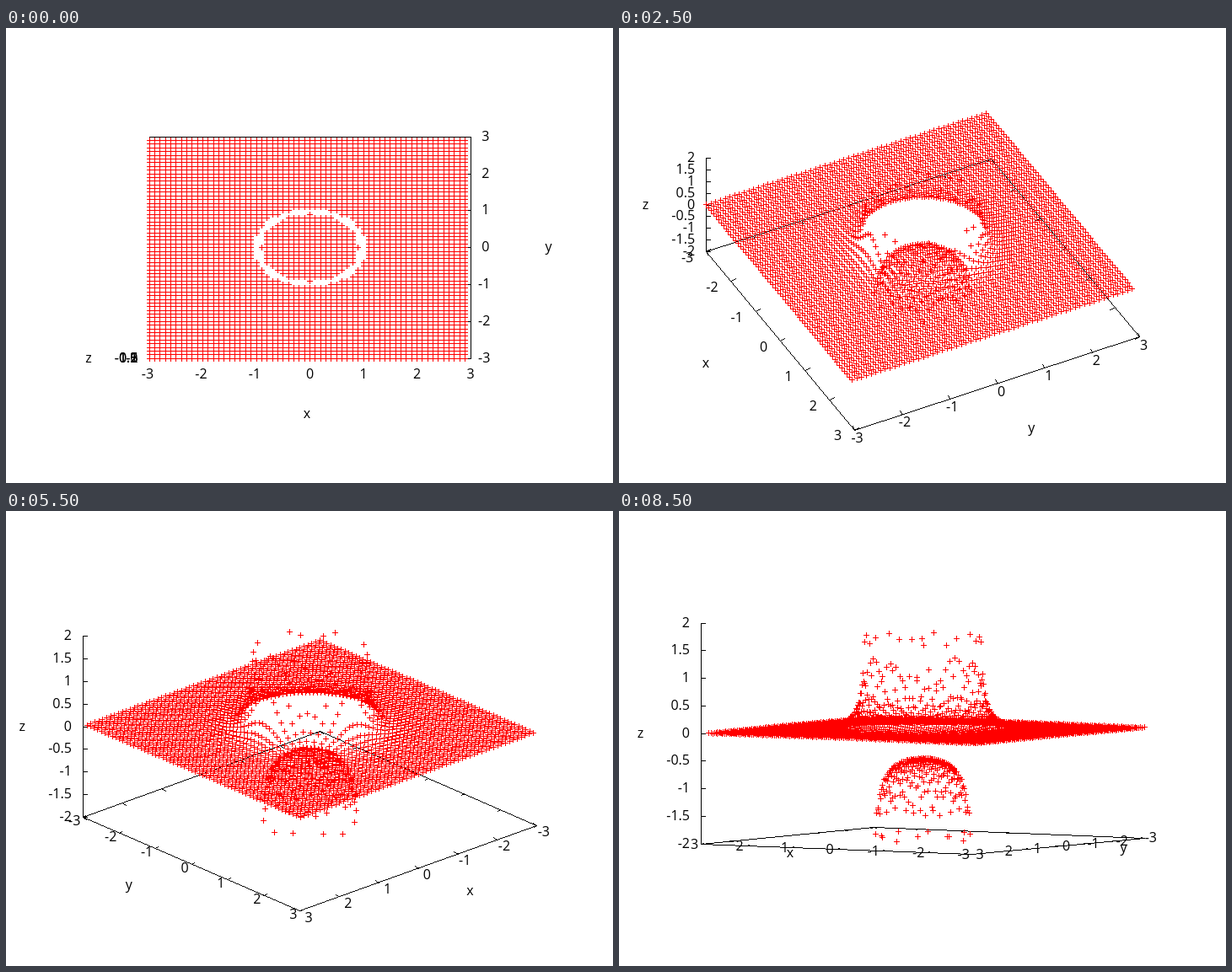
Animation, 720 px wide and 540 px high, one loop 9000 ms. Source, as an HTML page with a canvas:

```html
<!DOCTYPE html>
<html lang="en">
<head>
<meta charset="utf-8">
<title>Rotating surface plot</title>
<style>
  html, body { margin: 0; width: 100%; height: 100%; overflow: hidden; background: #fff; }
  canvas { display: block; }
</style>
</head>
<body>
<canvas id="stage" width="720" height="540"></canvas>
<script>
const ctx = document.getElementById('stage').getContext('2d');
const STEP_MS = 500, STEPS = 18;
const TILT_STEP = 5, TURN_STEP = 12.5;      // degrees per step
const CX = 360, CY = 260.2;                 // centre of the box
const W = 381, H = 263;                     // box size on screen
const RANGE = 3, Z_RANGE = 2;
const FONT = '16px "Open Sans", "Noto Sans", sans-serif';
const rad = deg => deg * Math.PI / 180;

// Complete elliptic integrals K and E by the arithmetic-geometric mean.
function elliptic(m) {
  let a = 1, b = Math.sqrt(1 - m), sum = m / 2, weight = 0.5;
  for (let i = 0; i < 12; i++) {
    const c = (a - b) / 2;
    [a, b] = [(a + b) / 2, Math.sqrt(a * b)];
    weight *= 2;
    sum += weight * c * c;
  }
  const K = Math.PI / 2 / a;
  return [K, K * (1 - sum)];
}

// Axial field of a unit current loop, in the plane of the loop.
function field(r) {
  const [K, E] = elliptic(4 * r / (1 + r) ** 2);
  return -(K / (1 + r) + E / (1 - r)) / (2 * Math.PI);
}

const points = [];
for (let i = -30; i < 30; i++) {
  for (let j = -30; j < 30; j++) {
    const n = i * i + j * j;
    if (n === 100) continue;
    const z = field(Math.sqrt(n) / 10);
    if (Math.abs(z) <= Z_RANGE) points.push([i / 10, j / 10, z]);
  }
}

function line(...ends) {
  const [x1, y1, x2, y2] = ends.map(Math.round);
  const n = Math.max(1, Math.abs(x2 - x1), Math.abs(y2 - y1));
  for (let i = 0; i <= n; i++) {
    ctx.fillRect(Math.round(x1 + (x2 - x1) * i / n), Math.round(y1 + (y2 - y1) * i / n), 1, 1);
  }
}

function text(str, x, y, align = 'center') {
  ctx.textAlign = align;
  ctx.fillText(str, x, Math.round(y + 5));
}

const signed = v => (v < 0 ? '' : ' ') + v;

function draw(step) {
  const turn = rad(step * TURN_STEP), tilt = rad(step * TILT_STEP);
  const cosT = Math.cos(turn), sinT = Math.sin(turn);
  const flat = Math.cos(tilt), rise = Math.sin(tilt);
  const project = (x, y, z) => [
    CX + W / 6 * (x * cosT + y * sinT),
    CY - H / 6 * (y * cosT - x * sinT) * flat - H / 4 * z * rise
  ];

  ctx.fillStyle = '#fff';
  ctx.fillRect(0, 0, 720, 540);
  ctx.fillStyle = '#000';
  ctx.font = FONT;

  // An axis lies on the nearer base edge; (a, b) points outward from it.
  function axis(name, at, side, a, b, tick, label) {
    for (const s of [side, -side]) {
      line(...at(-RANGE, s), ...at(RANGE, s));
      for (let v = -RANGE; v <= RANGE; v++) {
        const [x, y] = at(v, s), k = s === side ? -1 : 1;
        line(x, y, x + k * a * tick[0], y + k * b * tick[1]);
      }
    }
    const align = a > 0.86 ? 'left' : a < -0.86 ? 'right' : 'center';
    for (let v = -RANGE; v <= RANGE; v++) {
      const [x, y] = at(v, side);
      text(signed(v), x + a * label[0] - 1.5, y + b * label[1], align);
    }
    const [mx, my] = at(0, side);
    text(name, mx + 96 * a - 3, my + 66 * b);
  }

  const ySide = cosT >= 0 ? -RANGE : RANGE, yOut = Math.sign(ySide);
  const xSide = sinT >= 0 ? RANGE : -RANGE, xOut = Math.sign(xSide);
  axis('x', (v, s) => project(v, s, -Z_RANGE), ySide,
    yOut * sinT, Math.abs(cosT) * flat, [6, 7], [15, 19]);
  axis('y', (v, s) => project(s, v, -Z_RANGE), xSide,
    xOut * cosT, Math.abs(sinT) * flat, [4.5, 5], [11, 12.8]);

  let corner = [-RANGE, -RANGE];
  for (const c of [[-RANGE, RANGE], [RANGE, RANGE], [RANGE, -RANGE]]) {
    if (project(...c, 0)[0] < project(...corner, 0)[0] - 0.01) corner = c;
  }
  line(...project(...corner, -Z_RANGE), ...project(...corner, Z_RANGE));
  for (let z = -Z_RANGE; z <= Z_RANGE; z += 0.5) {
    const [x, y] = project(...corner, z);
    line(x, y, x + 5, y);
    text(signed(z), x - 13, y, 'right');
  }
  const [zx, zy] = project(...corner, 0);
  text('z', zx - 71.5, zy);

  ctx.fillStyle = '#f00';
  for (const p of points) {
    const [x, y] = project(...p).map(Math.round);
    ctx.fillRect(x - 3, y, 7, 1);
    ctx.fillRect(x, y - 3, 1, 7);
  }
}

let shown = -1;
const start = performance.now();
function tick() {
  const step = Math.floor((performance.now() - start) / STEP_MS) % STEPS;
  if (step !== shown) draw(shown = step);
  requestAnimationFrame(tick);
}
draw(shown = 0);
requestAnimationFrame(tick);
</script>
</body>
</html>
```
